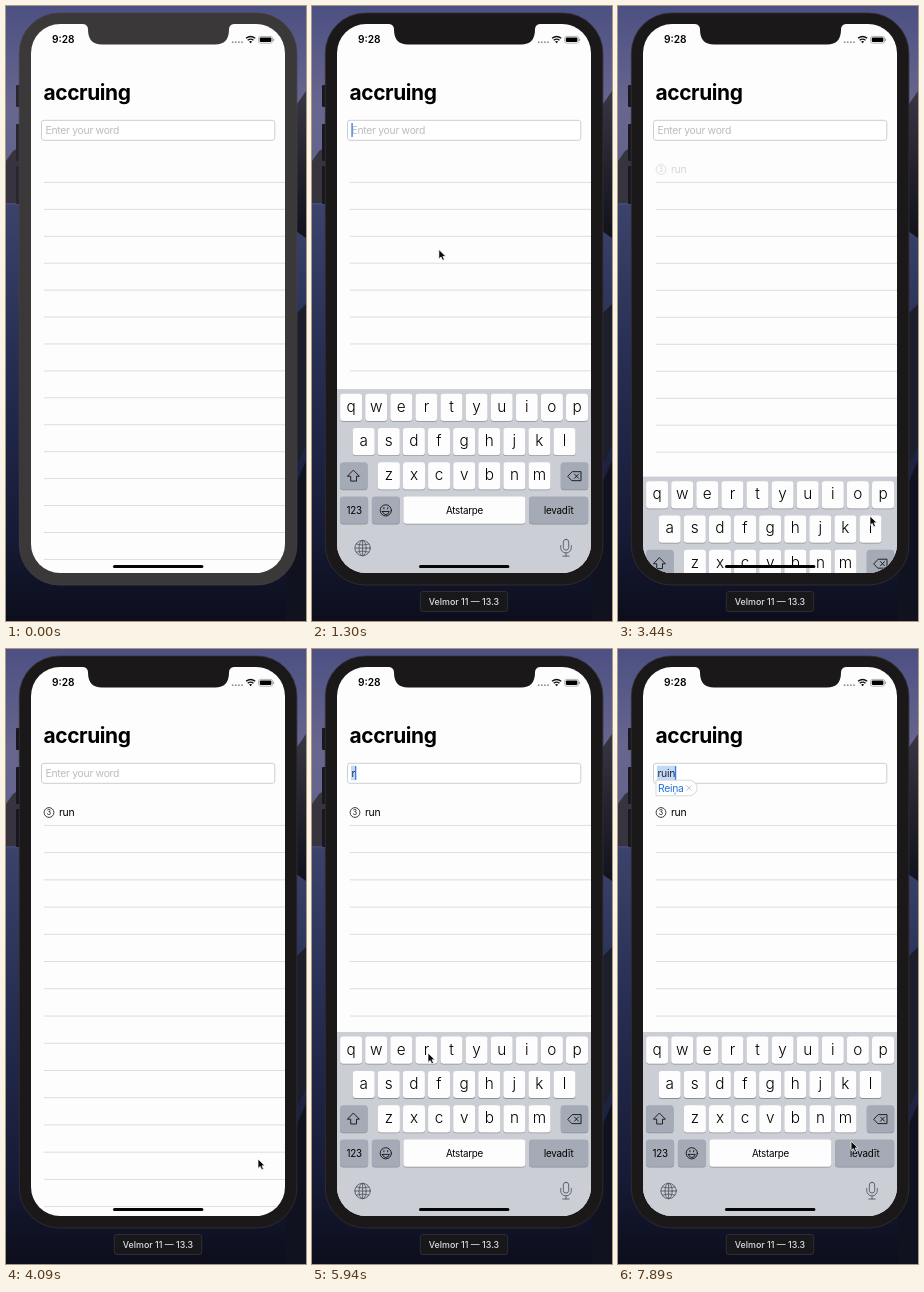
An HTML page that plays this animation: 300x615 px, repeating every 7990 ms.

```html
<!DOCTYPE html>
<html lang="en">
<head>
<meta charset="utf-8">
<title>Word game</title>
<style>
  html, body { margin: 0; width: 100%; height: 100%; overflow: hidden; background: #14172d; }
  svg { display: block; width: 100vw; height: 100vh; }
  text { font-family: Inter, "Open Sans", sans-serif; }
  .body { font-size: 10.4px; letter-spacing: -.3px; }
  .letter { font-size: 15.3px; font-weight: 300; text-anchor: middle; }
  .word { font-size: 9.8px; letter-spacing: -.28px; text-anchor: middle; }
  .icon { fill: none; stroke: #111; stroke-width: .9; stroke-linejoin: round; stroke-linecap: round; }
  .soft { stroke: #565a60; }
</style>
</head>
<body>
<svg viewBox="0 0 300 615" preserveAspectRatio="none">
  <defs>
    <linearGradient id="dusk" x2="0" y2="1">
      <stop offset="0" stop-color="#4c5082"/>
      <stop offset=".16" stop-color="#68668f"/>
      <stop offset=".31" stop-color="#5f628c"/>
      <stop offset=".325" stop-color="#3b436c"/>
      <stop offset=".6" stop-color="#252c50"/>
      <stop offset=".85" stop-color="#171b36"/>
      <stop offset="1" stop-color="#0c0e1c"/>
    </linearGradient>
    <linearGradient id="rock" x2="0" y2="1">
      <stop offset="0" stop-color="#383643"/>
      <stop offset=".5" stop-color="#24232d"/>
      <stop offset="1" stop-color="#11121d"/>
    </linearGradient>
    <clipPath id="screen"><rect x="25" y="18" width="254" height="549" rx="29"/></clipPath>
  </defs>

  <rect width="300" height="615" fill="url(#dusk)"/>
  <path d="M0 155L7 145 20 137V197H0Z" fill="#38343f"/>
  <path d="M280 122L291 98 300 85V232L280 218Z" fill="url(#rock)"/>
  <path d="M280 318L292 306 300 298V440L280 480Z" fill="#1d1e2b"/>
  <path d="M280 500L300 455V615H280Z" fill="#10121f"/>

  <g id="buttons">
    <rect x="10" y="79" width="6" height="22" rx="1"/>
    <rect x="10" y="118" width="6" height="37" rx="1"/>
    <rect x="10" y="160" width="6" height="38" rx="1"/>
  </g>
  <rect id="shell" x="13.3" y="7" width="277.6" height="572" rx="40" stroke-width=".8"/>

  <g clip-path="url(#screen)">
    <rect x="25" y="18" width="254" height="549" fill="#fefdfe"/>
    <text x="37.6" y="94.3" font-size="20.9" font-weight="700" letter-spacing="-.4">accruing</text>
    <g id="lines" stroke="#dcdce1" stroke-width="1"></g>
    <g id="row">
      <circle cx="43" cy="163.5" r="4.9" fill="none" stroke="#111" stroke-width=".8"/>
      <text x="43" y="166" font-size="7" text-anchor="middle">3</text>
      <text class="body" x="53" y="167.2">run</text>
    </g>
    <rect x="35.5" y="114.3" width="233.3" height="20" rx="2.5" fill="#fff" stroke="#cdcdd3" stroke-width="1"/>
    <rect id="mark" x="39" y="116.7" height="14.6" fill="#c3d9f5"/>
    <text id="hint" class="body" x="39.5" y="127.8" fill="#bcbcc2">Enter your word</text>
    <text id="typed" class="body" x="39.5" y="127.8" fill="#20283a"></text>
    <rect id="caret" y="117" width="1.3" height="14" fill="#3b78e8"/>
    <g id="bubble">
      <path id="bubbleShape" fill="#fff" stroke="#cfcfd3" stroke-width=".8"/>
      <text id="advice" class="body" x="40" y="142.8" fill="#2673dc"></text>
      <path id="cross" d="M-2.6 -2.6L2.6 2.6M2.6 -2.6L-2.6 2.6" stroke="#b4b4b9" stroke-width=".8"/>
    </g>
    <g id="keyboard">
      <rect x="25" y="383" width="254" height="190" fill="#cbced4"/>
      <g id="keys"></g>
      <path class="icon" d="M41.6 464.3L47.4 470.2H44.5V475H38.7V470.2H35.8Z"/>
      <path class="icon" d="M256 470L260.2 465.6H269V474.6H260.2ZM262.5 468L266.5 472.2M266.5 468L262.5 472.2"/>
      <g class="icon">
        <circle cx="73.8" cy="504.3" r="5.6"/>
        <path d="M70.3 505.4H77.3Q76.5 508.5 73.8 508.5T70.3 505.4ZM71.9 501.6V502.8M75.7 501.6V502.8"/>
      </g>
      <g class="icon soft">
        <circle cx="50.6" cy="542" r="7.7"/>
        <ellipse cx="50.6" cy="542" rx="3.6" ry="7.7"/>
        <path d="M50.6 534.3V549.7M42.9 542H58.3M44.4 538Q50.6 540.2 56.8 538M44.4 546Q50.6 543.8 56.8 546"/>
      </g>
      <g class="icon soft">
        <rect x="251.3" y="533.3" width="5.4" height="10.8" rx="2.7"/>
        <path d="M248.7 539.5V541.6A5.3 5.3 0 0 0 259.3 541.6V539.5M254 547V550M250.8 550H257.2"/>
      </g>
    </g>
    <rect x="107" y="559" width="90.4" height="3.1" rx="1.5" fill="#050505"/>
    <text x="46" y="37.2" font-size="10.2" font-weight="600">9:28</text>
    <g fill="#8c8c90">
      <circle cx="226.7" cy="36.2" r=".9"/><circle cx="229.8" cy="36.2" r=".9"/>
      <circle cx="232.9" cy="36.2" r=".9"/><circle cx="236" cy="36.2" r=".9"/>
    </g>
    <path d="M240 32.3Q244.6 28.7 249.2 32.3M241.7 34.3Q244.6 32 247.5 34.3" fill="none" stroke="#111" stroke-width="1.4"/>
    <path d="M243.1 35.5Q244.6 34.4 246.1 35.5L244.6 37.2Z"/>
    <rect x="252.6" y="30.4" width="14" height="6.8" rx="2" fill="none" stroke="#97979b" stroke-width=".7"/>
    <rect x="253.8" y="31.5" width="11.6" height="4.6" rx="1"/>
    <path d="M267.6 32.7V35" stroke="#97979b"/>
  </g>
  <path id="notch" d="M77 17.5V18Q82 18.5 82 23.5 82 38.5 96 38.5H209Q223 38.5 223 23.5 223 18.5 228 18V17.5Z"/>

  <g id="label">
    <rect x="108.3" y="585.5" width="87.4" height="20" rx="2.5" fill="#18181b" stroke="#34343b" stroke-width=".8"/>
    <text x="152" y="598.8" font-size="8.9" font-weight="500" text-anchor="middle" fill="#dededf">Velmor 11 — 13.3</text>
  </g>
  <path id="pointer" d="M0 0V9.4L2.2 7.4 3.8 10.8 5.5 10 4 6.8H6.9Z" fill="#080808" stroke="#fff" stroke-width=".7"/>
</svg>

<script>
const LOOP = 7990, STEP = LOOP / 86;
const $ = id => document.getElementById(id);
const set = (node, attrs) => {
  for (const name in attrs) node.setAttribute(name, attrs[name]);
  return node;
};
const add = (parent, tag, attrs, text = '') => {
  const node = set(document.createElementNS('http://www.w3.org/2000/svg', tag), attrs);
  node.textContent = text;
  return parent.appendChild(node);
};
const show = (id, on) => { $(id).style.display = on ? '' : 'none'; };

const lines = Array.from({ length: 15 }, () => add($('lines'), 'line', { x1: 38, x2: 279 }));

function key(x, y, width, label = '', kind = 'letter', fill = '#fdfdfe') {
  const box = { x, width, height: 27.2, rx: 3 };
  add($('keys'), 'rect', { ...box, y: y + .8, fill: '#8b8f96' });
  add($('keys'), 'rect', { ...box, y, fill });
  add($('keys'), 'text', { x: x + width / 2, y: y + (kind === 'letter' ? 18 : 17.2), class: kind }, label);
}
[['qwertyuiop', 28.1], ['asdfghjkl', 40.7], ['zxcvbnm', 65.9]].forEach(([row, x], r) =>
  [...row].forEach((c, i) => key(x + i * 25.1, 387.6 + r * 34.3, 22, c)));
const GREY = '#a4abb6';
key(28.1, 456.2, 27.4, '', 'word', GREY);
key(248.8, 456.2, 27.4, '', 'word', GREY);
key(28.1, 490.5, 28, '123', 'word', GREY);
key(59.9, 490.5, 28, '', 'word', GREY);
key(91.4, 490.5, 122, 'Atstarpe', 'word');
key(217.1, 490.5, 59.1, 'Ievadīt', 'word', GREY);

// time, x, y of the pointer tip
const PATH = [
  [180, 301, 235], [370, 240, 190], [560, 165, 140], [840, 133, 123], [1110, 133, 123],
  [1390, 124, 300], [1670, 117, 402], [1860, 117, 402], [2040, 161, 402], [2140, 188, 404],
  [2230, 188, 404], [2510, 203, 467], [2600, 203, 467], [2880, 238, 500], [3060, 252, 510],
  [4090, 252, 510], [4180, 218, 223], [4270, 185, 172], [4370, 138, 133], [4550, 113, 122],
  [4650, 113, 122], [4830, 126, 255], [4920, 135, 369], [5015, 133, 400], [5200, 132, 408],
  [5300, 132, 408], [5480, 116, 404], [6130, 116, 404], [6400, 188, 405], [6600, 188, 405],
  [6875, 217, 405], [6960, 219, 407], [7100, 219, 407], [7340, 203, 467], [7600, 203, 467],
  [7800, 228, 475], [7895, 233, 492], [LOOP, 237, 500]
];
// time, field text, suggestion
const TYPING = [
  [0, ''], [1855, 'r'], [2225, 'ru', 'Tu'], [2595, 'run'], [3400, ''],
  [5570, 'r'], [6500, 'ru', 'Tu'], [7050, 'rui'], [7520, 'ruin', 'Reiņa']
];

function pointerAt(t) {
  const i = PATH.findIndex(p => p[0] > t);
  const [t0, x0, y0] = PATH[i - 1], [t1, x1, y1] = PATH[i];
  const k = (t - t0) / (t1 - t0);
  return [x0 + (x1 - x0) * k, y0 + (y1 - y0) * k];
}
// remaining share of a critically damped spring released at `start`
function spring(t, start) {
  const s = Math.max(0, t - start) * .0305;
  return (1 + s) * Math.exp(-s);
}
function keyboardOffset(t) {
  if (t < 3385) return 184 * spring(t, 967);
  if (t < 4685) return 184 * (1 - spring(t, 3385));
  return 184 * spring(t, 4687);
}

function render(t) {
  const active = t >= 460;
  set($('shell'), { fill: active ? '#1a1819' : '#3b3839', stroke: active ? '#343135' : '#454244' });
  set($('notch'), { fill: active ? '#1a1819' : '#3b3839' });
  set($('buttons'), { fill: active ? '#19171e' : '#29272d' });
  show('label', active);

  const inserted = Math.min(1, Math.max(0, (t - 3390) / 300));
  lines.forEach((line, i) => {
    const y = 176.4 + i * (26.93 + .3 * inserted);
    set(line, { y1: y, y2: y });
  });
  set($('row'), { opacity: inserted });
  set($('keyboard'), { transform: `translate(0 ${keyboardOffset(t)})` });

  const [, text, advice] = TYPING.filter(s => s[0] <= t).pop();
  $('typed').textContent = text;
  const width = text ? $('typed').getComputedTextLength() : 0;
  show('hint', !text);
  set($('mark'), { width: text ? width + .6 : 0 });
  set($('caret'), { x: 39.4 + width });
  show('caret', (t > 967 && t < 3385) || t > 4687);

  show('bubble', advice);
  if (advice) {
    $('advice').textContent = advice;
    const end = 40 + $('advice').getComputedTextLength();
    set($('bubbleShape'), { d: `M38 131.2H${end + 5.7}a7.8 7.8 0 0 1 0 15.6H38Z` });
    set($('cross'), { transform: `translate(${end + 5.3} 139)` });
  }

  show('pointer', t >= PATH[0][0]);
  if (t >= PATH[0][0]) set($('pointer'), { transform: `translate(${pointerAt(t)})` });
}

const begin = performance.now();
function tick() {
  const t = (performance.now() - begin) % LOOP;
  render(Math.floor(t / STEP + .1) % 86 * STEP);
  requestAnimationFrame(tick);
}
tick();
</script>
</body>
</html>
```
